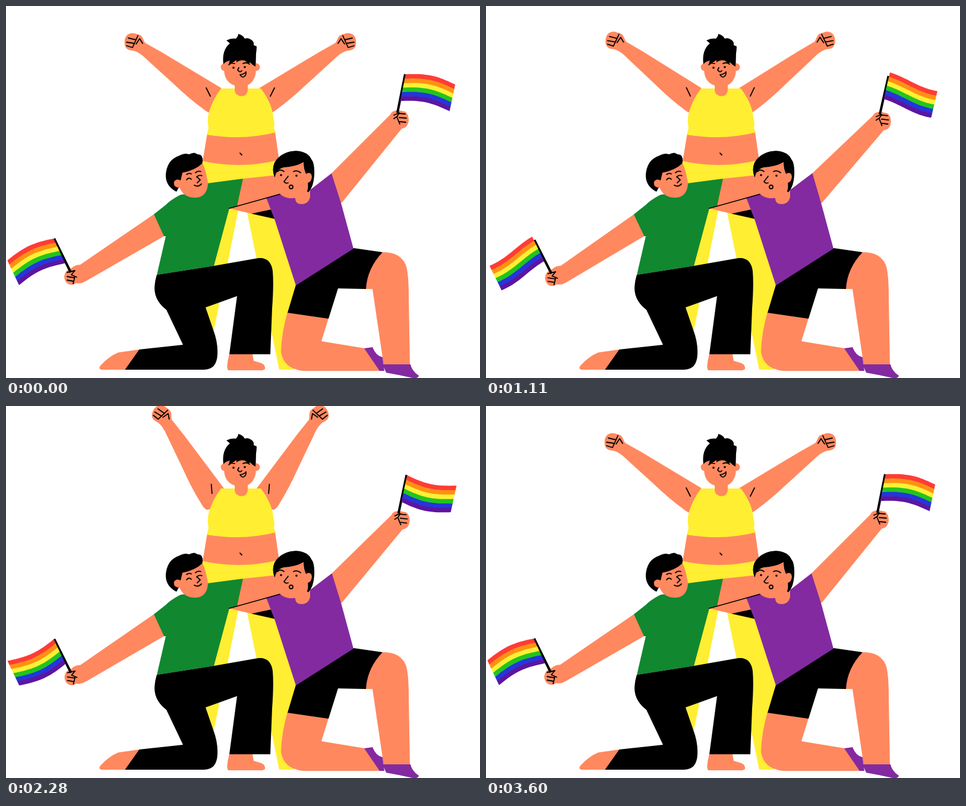
Animation, 798 px wide and 627 px high, one loop 3630 ms. Source, as an HTML page:

```html
<!DOCTYPE html>
<html lang="en">
<head>
<meta charset="utf-8">
<title>Three friends with flags</title>
<style>
html, body { margin: 0; width: 100%; height: 100%; overflow: hidden; background: #fff; }
svg { display: block; width: 798px; height: 627px; }
.skin { fill: #ff885f; }
.yellow { fill: #ffee32; }
.green { fill: #118730; }
.purple { fill: #832aa1; }
.line { fill: none; stroke: #000; stroke-width: 1.8; stroke-linecap: round; stroke-linejoin: round; }
.pole { stroke: #000; stroke-width: 4; }
</style>
</head>
<body>
<svg viewBox="0 0 798 627">
  <defs>
    <g id="raisedArm">
      <path class="skin" d="M200 66Q198 54 205 48Q212 44 219 47Q229 48 231 56L234 62L264 79L362 138L372 165L346 181Q340 180 334 175Q308 156 283 132L238 91Q222 75 211 75Q202 74 200 66Z"/>
      <path class="line" d="M206 54L219 57M203 61L216 63M203 67L213 70M222 50L218 59L213 70M219 64L225 55L230 63M337 138L344 152"/>
    </g>
  </defs>

  <!-- standing figure -->
  <g class="raised"><use href="#raisedArm"/></g>
  <g transform="translate(789 0) scale(-1 1)"><g class="raised"><use href="#raisedArm"/></g></g>
  <path class="skin" d="M339 214L330 268H461L453 212Z"/>
  <path class="yellow" d="M330 261Q395 276 461 259L470 345L490 470L485 613H460L406 348L391 345L350 546H338L325 500Z"/>
  <path class="yellow" d="M362 139H429Q448 164 450 187Q453 199 451 206L454 213Q398 227 338 217L341 206Q338 190 342 178Q348 158 362 139Z"/>
  <path class="line" d="M394 248L397 251"/>
  <path class="skin" d="M385 125H407V142Q406 152 396 152Q386 151 385 142Z"/>
  <circle class="skin" cx="368" cy="103" r="6.5"/>
  <circle class="skin" cx="421" cy="103" r="6.5"/>
  <path class="skin" d="M367 85H421V108Q419 136 394 136Q368 133 367 108Z"/>
  <path d="M366 98Q363 74 377 63L371 58Q379 54 387 55Q391 51 391 47Q399 49 402 55Q408 53 413 57Q418 60 417 66L422 68Q422 74 421 80L420 102Q414 99 411 95L408 97L402 92Q394 90 388 95L388 91Q382 96 375 97L377 92Q370 93 366 98Z"/>
  <path class="line" d="M375 99Q379 95 385 97M399 97Q405 94 410 98M392 104L390 108Q394 113 397 109M394 116Q401 115 404 111Q405 118 399 120Q396 119 394 116"/>
  <circle cx="383" cy="104" r="1.8"/><circle cx="402" cy="103" r="1.8"/>

  <!-- embracing arms -->
  <path class="skin" d="M399 291L456 285L465 318L376 341Z"/>
  <path class="skin" d="M376 341L440 322L448 345L413 350Z"/>
  <path d="M413 350L446 343L453 359Z"/>

  <!-- kneeling figure, left -->
  <g id="armL">
    <path class="skin" d="M249 351L125 436Q116 436 110 442Q99 445 98 456Q99 469 110 470Q116 469 118 467Q126 469 134 464L266 388L275 360Z"/>
    <path class="pole" d="M81 392L109 449"/>
    <g id="flagL"></g>
    <path class="line" d="M103 449L116 446L110 453L119 457M103 456L115 458M103 462L114 464M116 456L113 468"/>
  </g>
  <path id="shirtL" class="green"/>
  <path d="M254 453L350 438L424 425Q446 423 449 447Q451 470 448 510L445 587H376L389 489L336 508L349 546Q357 567 356 587Q355 613 333 613H200L224 579L298 571L270 512Q250 497 250 475Q251 461 254 453Z"/>
  <path class="skin" d="M224 579L200 613H160Q155 611 159 606Q174 590 189 584Z"/>
  <path class="skin" d="M376 587H415L417 598L430 602Q437 605 436 612L432 614H374Q370 609 376 587Z"/>
  <path d="M287 313Q268 303 269 284Q271 260 290 253Q301 247 308 250Q318 245 322 250Q330 249 331 258Q332 267 325 271L300 290Z"/>
  <path class="skin" d="M297 281Q318 277 331 265Q338 281 340 300Q338 323 318 323Q299 323 292 306Q281 306 283 296Q287 290 294 294Z"/>
  <path class="line" d="M304 284Q308 281 312 283M304 293Q307 288 312 292M319 281Q323 277 328 279M321 288Q325 284 330 286M321 288L327 293L322 298M317 302Q323 306 329 300"/>

  <!-- kneeling figure, right -->
  <g id="armR">
    <path class="skin" d="M548 282L647 183Q650 175 662 176L672 178Q678 182 678 193Q677 205 666 207L565 332L550 320Z"/>
    <path class="pole" d="M672 115L659 180"/>
    <g id="flagR"></g>
    <path class="line" d="M653 184L662 180L658 187L663 199M653 190L657 187M661 181L672 182M662 188L674 189M663 195L673 196"/>
  </g>
  <path class="skin" d="M634 415Q665 414 674 439Q678 454 678 490L680 606H636L617 477H604L600 440Z"/>
  <path class="skin" d="M474 516L543 526L531 565L604 577L632 615H500Q466 611 463 582Q464 550 474 516Z"/>
  <path d="M585 408L634 415Q608 442 606 477L559 476L543 527L474 517L488 470Z"/>
  <path class="purple" d="M603 577L617 575Q623 590 634 592L637 615H629Z"/>
  <path class="purple" d="M634 604H681Q683 615 695 623Q694 628 685 627Q663 622 640 618Z"/>
  <path id="shirtR" class="purple"/>
  <path class="line" d="M376 341L462 317"/>
  <path class="skin" d="M484 310L512 300V322Q509 334 498 334Q487 334 487 324Z"/>
  <path d="M452 288Q447 276 452 264Q463 245 488 244Q508 245 514 258Q520 265 519 285Q518 305 509 314L490 300Z"/>
  <path class="skin" d="M453 287Q456 275 467 272Q488 271 501 263Q501 274 505 283Q514 278 515 288Q514 297 508 298Q510 310 504 317Q490 325 477 324Q457 321 454 301Z"/>
  <path class="line" d="M457 279Q462 274 468 279M484 279Q490 276 496 281M475 287L468 296Q471 300 475 298"/>
  <circle cx="463" cy="285" r="1.8"/><circle cx="489" cy="286" r="1.8"/>
  <circle class="line" cx="480" cy="305" r="3"/>
</svg>
<script>
const LOOP = 3630, STEP = 30, WAVE = 1800;
const COLORS = ['#ff3c35', '#ff9114', '#fff035', '#23c41c', '#2436db', '#5c15a0'];
const byId = id => document.getElementById(id);
const raised = document.querySelectorAll('.raised');

// Sine-eased value through [time, value] keys.
function track(keys, t) {
  if (t <= keys[0][0]) return keys[0][1];
  for (let i = 1; i < keys.length; i++) {
    const [t0, a] = keys[i - 1], [t1, b] = keys[i];
    if (t < t1) return a + (b - a) * (1 - Math.cos(Math.PI * (t - t0) / (t1 - t0))) / 2;
  }
  return keys[keys.length - 1][1];
}

const RAISE = [[1030, 0], [1630, 22.1], [2390, 22.1], [2990, 0]];
const LEFT = [[1040, 0], [1570, -18], [2100, 0], [2240, 0], [2770, -18], [3300, 0]];
const RIGHT = [[130, 0], [700, 13.6], [1220, 0], [1780, 13.6], [2360, 0]];
const RIPPLE = [[0, 0], [700, 228], [1400, 270], [WAVE, 360]];
const PIVOT_L = [261, 361], PIVOT_R = [556, 341];

function turn([x, y], [cx, cy], deg) {
  const a = deg * Math.PI / 180, c = Math.cos(a), s = Math.sin(a);
  return [cx + (x - cx) * c - (y - cy) * s, cy + (x - cx) * s + (y - cy) * c];
}

const spin = (el, deg, p) => el.setAttribute('transform', `rotate(${deg} ${p[0]} ${p[1]})`);
const point = p => p.map(n => n.toFixed(2)).join(' ');

// A flag hangs from its top corner; out and down are unit vectors.
function makeFlag(id, top, out, down, width) {
  const stripes = COLORS.map(color => {
    const path = document.createElementNS('http://www.w3.org/2000/svg', 'path');
    path.setAttribute('fill', color);
    byId(id).append(path);
    return path;
  });
  const N = 20, height = 46, band = height / COLORS.length;
  return phase => {
    const at = (u, v) => {
      const d = v - 6.5 * Math.sin(Math.PI * u - phase);
      return point([0, 1].map(k => top[k] + out[k] * u * width + down[k] * d));
    };
    stripes.forEach((path, i) => {
      const pts = [], low = Math.min(height, (i + 1) * band + 0.6);
      for (let j = 0; j <= N; j++) pts.push(at(j / N, i * band));
      for (let j = N; j >= 0; j--) pts.push(at(j / N, low));
      path.setAttribute('d', 'M' + pts.join('L') + 'Z');
    });
  };
}

const flags = [
  makeFlag('flagL', [80, 392], [-0.904, 0.428], [0.428, 0.904], 86),
  makeFlag('flagR', [673, 115], [0.979, 0.204], [-0.204, 0.979], 85)
];

function draw(t) {
  const up = track(RAISE, t), left = track(LEFT, t), right = track(RIGHT, t);
  raised.forEach(el => spin(el, up, [357, 157]));
  spin(byId('armL'), left, PIVOT_L);
  spin(byId('armR'), right, PIVOT_R);

  const l1 = point(turn([249, 351], PIVOT_L, left)), l2 = point(turn([266, 388], PIVOT_L, left));
  byId('shirtL').setAttribute('d',
    `M294 318Q278 326 268 336L${l1}L${l2}L269 388L254 453L350 438L376 341L389 337L399 291L338 299L318 315Z`);
  const r1 = point(turn([548, 282], PIVOT_R, right)), r2 = point(turn([564, 332], PIVOT_R, right));
  byId('shirtR').setAttribute('d', `M438 323L462 316L512 310L${r1}L${r2}L585 409L488 471L452 359Z`);

  const phase = track(RIPPLE, t % WAVE) * Math.PI / 180;
  flags.forEach(wave => wave(phase));
}

const start = performance.now();
function tick() {
  const t = (performance.now() - start) % LOOP;
  draw(Math.floor(t / STEP) * STEP);
  requestAnimationFrame(tick);
}
draw(0);
requestAnimationFrame(tick);
</script>
</body>
</html>
```
